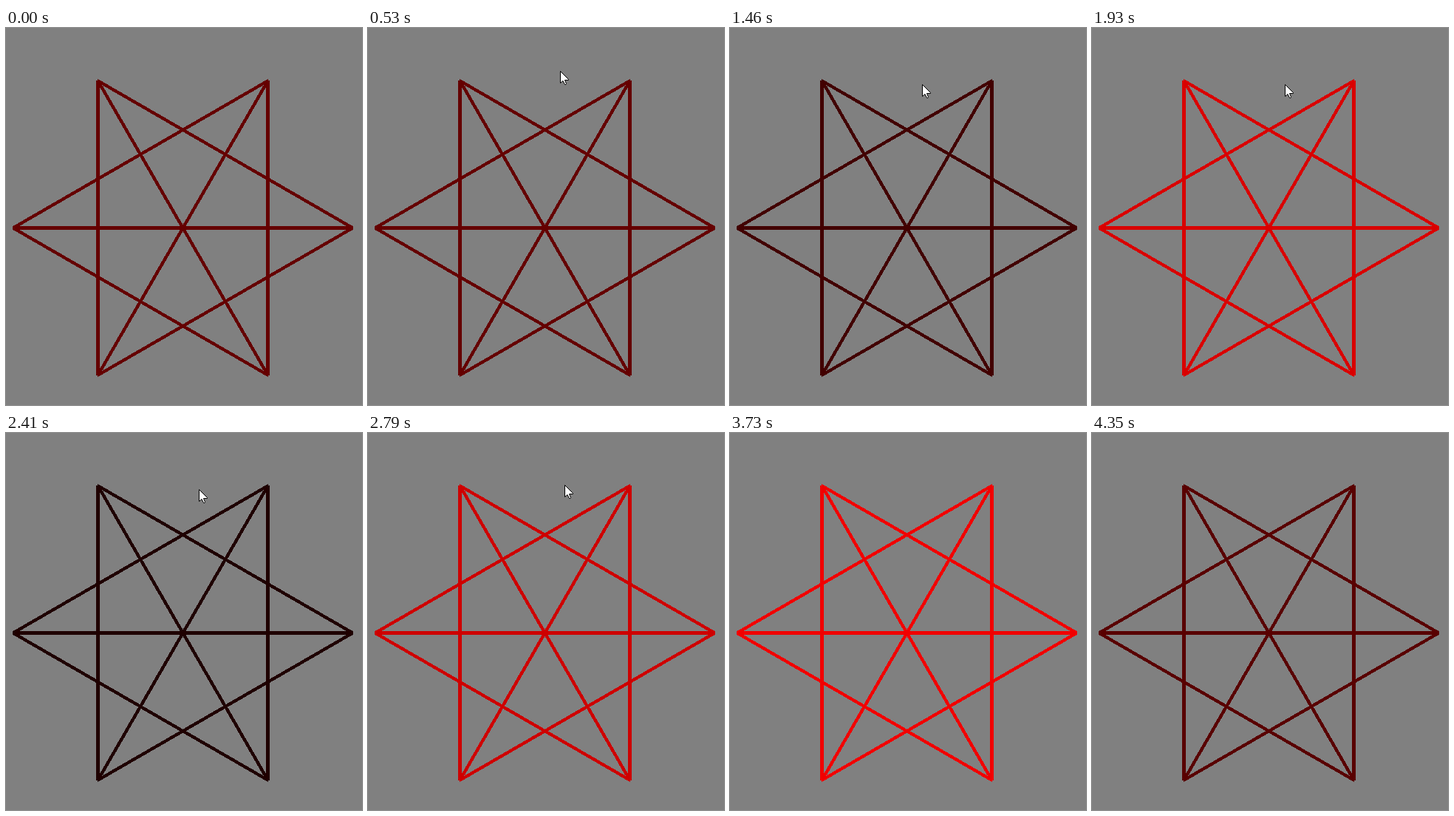
An HTML page with a canvas that plays this animation: 482x510 px, repeating every 4430 ms.

```html
<!DOCTYPE html>
<html>
<head>
<meta charset="utf-8">
<style>
html, body { margin: 0; width: 100%; height: 100%; overflow: hidden; background: #808080; }
canvas { display: block; }
</style>
</head>
<body>
<canvas id="stage" width="482" height="510"></canvas>
<script>
const ctx = document.getElementById('stage').getContext('2d');
const LOOP = 4430;
const TICK = 78;
const LEAD = 26;
const LAST_TICK = 56;
const CENTER = { x: 239, y: 270 };
const RADIUS = 230;

// Where the pointer turns or rests, by tick
const stops = [
  { tick: 2, x: 300, y: 485 },
  { tick: 3, x: 262, y: 72 },
  { tick: 11, x: 258, y: 43 },
  { tick: 14, x: 248, y: 70 },
  { tick: 20, x: 261, y: 76 },
  { tick: 35, x: 261, y: 76 },
  { tick: 37, x: 270, y: 64 },
  { tick: 41, x: 464, y: 485 }
];

const arrow = new Path2D('M0 0V16L3.5 13L6 18H7.5L8 17L6 12H11V11Z');

const vertices = Array.from({ length: 6 }, (_, i) => {
  const angle = i * Math.PI / 3;
  return {
    x: Math.round(CENTER.x + RADIUS * Math.cos(angle)),
    y: Math.round(CENTER.y + RADIUS * Math.sin(angle))
  };
});

const mix = (a, b, k) => Math.round(a + (b - a) * k);
const smooth = k => k * k * (3 - 2 * k);

// Stepped line, five pixels thick across its shorter axis
function drawLine(a, b) {
  const width = Math.abs(b.x - a.x), height = Math.abs(b.y - a.y);
  const length = Math.max(width, height);
  for (let i = 0; i <= length; i++) {
    const x = mix(a.x, b.x, i / length);
    const y = mix(a.y, b.y, i / length);
    if (height > width) ctx.fillRect(x - 2, y, 5, 1);
    else ctx.fillRect(x, y - 2, 1, 5);
  }
}

// Joins every pair of vertices that are not neighbours
function drawStar(red) {
  ctx.fillStyle = `rgb(${red}, 0, 0)`;
  for (let a = 0; a < 6; a++) {
    for (let b = a + 2; b < Math.min(6, a + 5); b++) {
      drawLine(vertices[a], vertices[b]);
    }
  }
}

// Triangle wave between black and full red
function redAt(tick) {
  const half = 5.625, peak = 48.5;
  const phase = Math.abs(tick - peak) % (2 * half);
  return Math.min(255, mix(2, 264, Math.abs(1 - phase / half)));
}

function pointerAt(tick) {
  const i = stops.findIndex(stop => stop.tick >= tick);
  if (i < 0 || tick < stops[0].tick) return null;
  const to = stops[i], from = stops[i - 1] || to;
  const k = smooth((tick - from.tick) / (to.tick - from.tick || 1));
  return { x: mix(from.x, to.x, k), y: mix(from.y, to.y, k) };
}

function drawPointer({ x, y }) {
  ctx.save();
  ctx.translate(x + 0.5, y + 0.5);
  ctx.fillStyle = '#fff';
  ctx.strokeStyle = '#000';
  ctx.fill(arrow);
  ctx.stroke(arrow);
  ctx.restore();
}

function render(time) {
  const tick = Math.min(LAST_TICK, Math.floor((time + LEAD) / TICK));
  ctx.fillStyle = '#808080';
  ctx.fillRect(0, 0, 482, 510);
  drawStar(redAt(tick));
  const pointer = pointerAt(tick);
  if (pointer) drawPointer(pointer);
}

const origin = performance.now();
function loop() {
  render((performance.now() - origin) % LOOP);
  requestAnimationFrame(loop);
}
loop();
</script>
</body>
</html>
```
